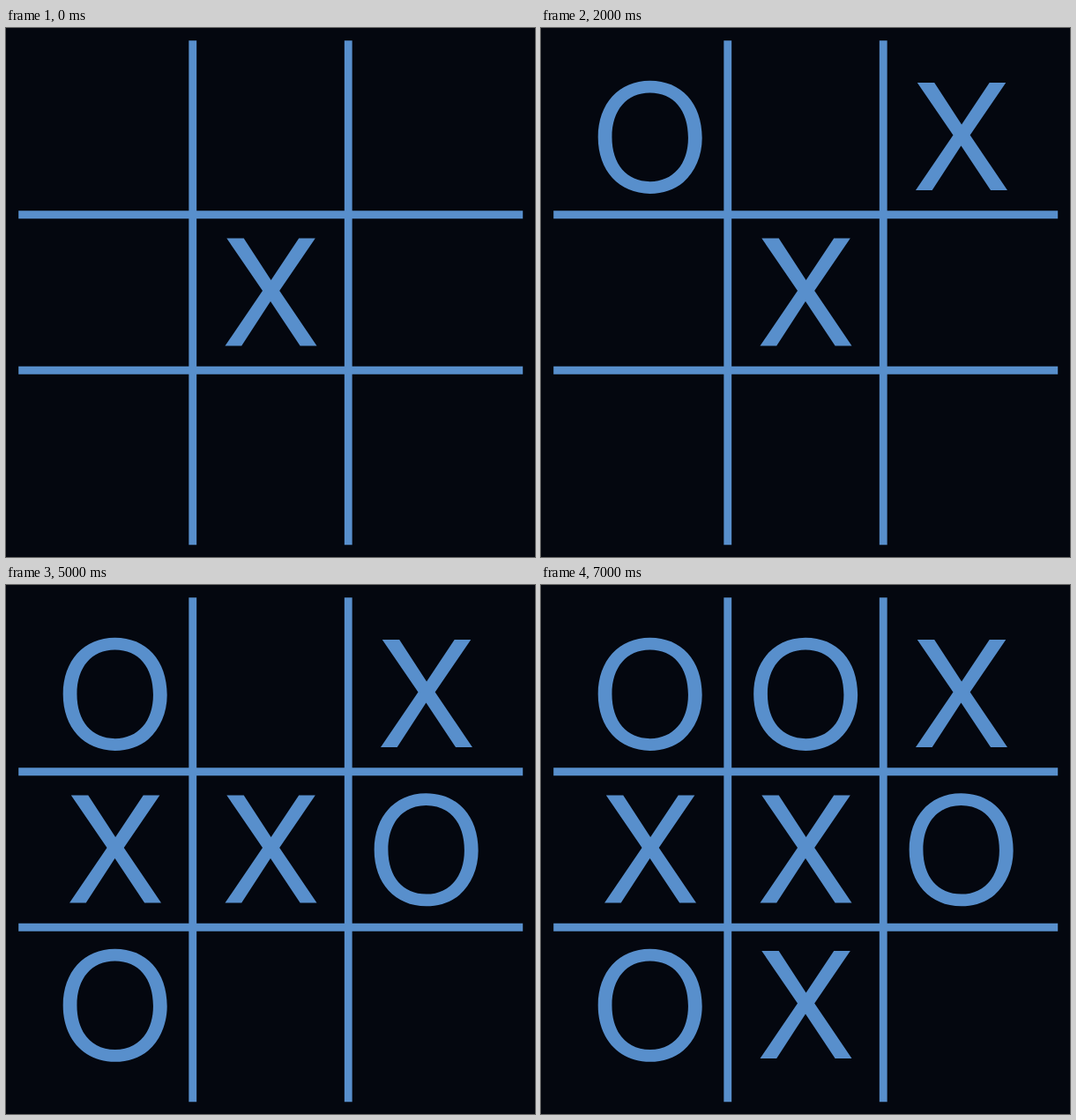
Recreate the animation shown at these times as an HTML page. Size 600x600 px, loop 8000 ms.

```html
<!DOCTYPE html>
<html lang="en">
<head>
<meta charset="utf-8">
<title>Noughts and crosses</title>
<style>
  html, body { margin: 0; width: 100%; height: 100%; overflow: hidden; background: #04070f; }
  svg { display: block; width: 100%; height: 100%; }
</style>
</head>
<body>
<svg viewBox="0 0 600 600">
  <defs>
    <path id="X" d="M-51.5 60.5L-9 -2L-49.7 -61.5H-30.3L.6 -14L32.2 -61.5H50.8L10.2 -2L52.5 60.5H33.6L0 10L-32.8 60.5Z"/>
    <path id="O" transform="translate(0 60.5) scale(.1676 -.1676) translate(-389 0)" fill-rule="evenodd"
      d="M389 741C180 741 38 585 38 359C38 132 180 -23 390 -23C478 -23 556 4 615 54C694 121 742 234 742 353C742 588 602 741 389 741Z
         M389 659C549 659 648 543 648 355C648 176 546 59 390 59C232 59 132 176 132 359C132 542 232 659 389 659Z"/>
  </defs>
  <rect width="600" height="600" fill="#04070f"/>
  <path id="grid" fill="none" stroke="#588fcc" stroke-width="8.82"/>
  <g id="marks" fill="#588fcc"></g>
</svg>
<script>
  const STEP = 1000, LOOP = 8000, CELL = 3000 / 17;
  // Cells in order of play, numbered row by row; X moves first.
  const moves = [4, 0, 2, 6, 3, 5, 7, 1];

  const lines = [300 - CELL / 2, 300 + CELL / 2];
  document.getElementById('grid').setAttribute('d',
    lines.map(p => `M${p} 14.2V586.2M14.2 ${p}H586.2`).join(''));

  const group = document.getElementById('marks');
  const marks = moves.map((cell, i) => {
    const mark = document.createElementNS('http://www.w3.org/2000/svg', 'use');
    const x = 300 + (cell % 3 - 1) * CELL;
    const y = 300 + (Math.floor(cell / 3) - 1) * CELL;
    mark.setAttribute('href', i % 2 ? '#O' : '#X');
    mark.setAttribute('transform', `translate(${x} ${y})`);
    return group.appendChild(mark);
  });

  function draw(time) {
    const turn = Math.floor(time % LOOP / STEP);
    marks.forEach((mark, i) => mark.setAttribute('visibility', i <= turn ? 'visible' : 'hidden'));
  }

  const start = performance.now();
  function tick() {
    draw(performance.now() - start);
    requestAnimationFrame(tick);
  }
  tick();
</script>
</body>
</html>
```
